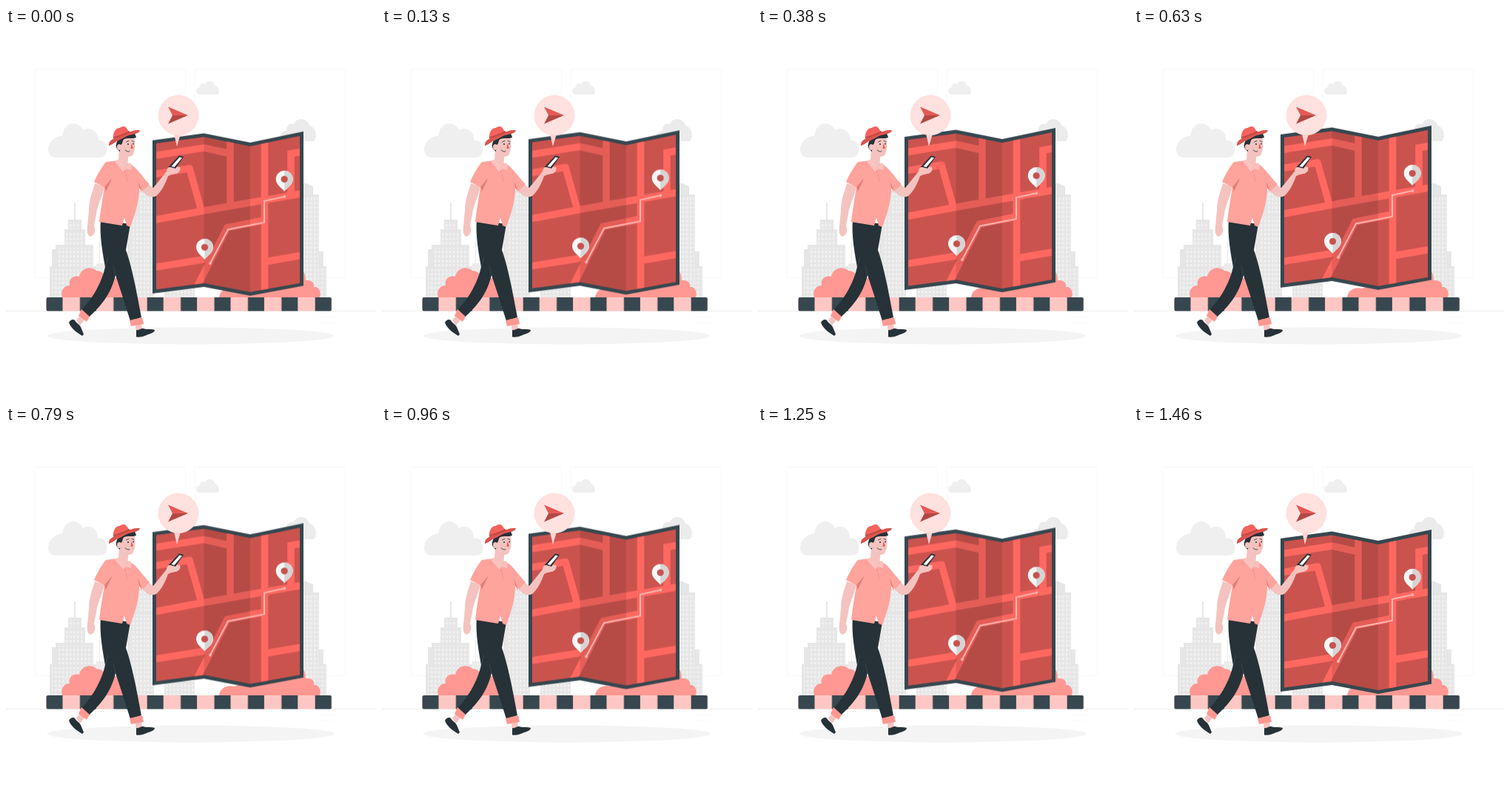
An HTML page that plays this animation: 500 px wide and 500 px high, repeating every 1500 ms.

```html
<!DOCTYPE html>
<html lang="en">
<head>
<meta charset="utf-8">
<title>Walking with a map</title>
<style>
html, body { margin: 0; width: 100%; height: 100%; overflow: hidden; background: #fff; }
svg { display: block; width: 100vw; height: 100vh; }
.map { animation: float 1.5s linear infinite; }
@keyframes float {
  0%, 97.4%, 100% { transform: translateY(0); }
  48.6% { transform: translateY(-9.4px); }
}
.skin { fill: #f4c3bf; }
.dark { fill: #263238; }
.slate { fill: #37474f; }
.shirt { fill: #ffa39d; }
.road { fill: none; stroke: #ff6861; stroke-width: 9.5; }
.line { fill: none; stroke: #263238; stroke-width: .8; stroke-linecap: round; }
</style>
</head>
<body>
<svg viewBox="0 0 500 500">
  <defs>
    <pattern id="windows" width="5" height="6" patternUnits="userSpaceOnUse">
      <rect x="1" y="1" width="2.6" height="3.6" fill="#f1f1f1"/>
    </pattern>
    <pattern id="kerb" x="76.5" width="45.4" height="20" patternUnits="userSpaceOnUse">
      <rect width="45.4" height="20" fill="#37474f"/>
      <rect width="23.4" height="20" fill="#ffc7c4"/>
    </pattern>
    <clipPath id="sheet">
      <path d="M203 156L267.500 147.500L330 160L397 146V345L330 357L267.500 345L203 353.500Z"/>
    </clipPath>
    <g id="pin">
      <path d="M0 16.500C-3 12 -11.500 8 -11.500 0A11.500 11.500 0 0 1 11.500 0C11.500 8 3 12 0 16.500Z" fill="#f7f7f7"/>
      <path d="M0 16.500C3 12 11.500 8 11.500 0A11.500 11.500 0 0 0 0 -11.500Z" fill="#d5d5d5"/>
      <circle r="4.600" fill="#c8524d"/>
    </g>
  </defs>

  <!-- backdrop -->
  <g fill="none" stroke="#f8f8f8">
    <path d="M39.500 55.500H242.500V337.500H39.500ZM255.500 55.500H458.500V337.500H255.500Z"/>
    <path d="M416 390.500H447M420 398.500H444" stroke="#fafafa"/>
  </g>
  <path d="M0 382.500H500" stroke="#ebebeb"/>
  <g fill="#ebebeb">
    <path d="M66 175C54 174 54 156 66 149C72 144 76 148 77 142C79 128 98 124 104 138C114 132 126 141 124 152C134 149 140 164 134 172Q131 175 126 175Z" fill="#efefef"/>
    <path d="M260 90C256 88 256 81 262 80C262 75 266 74 269 76C271 70 281 71 282 78C287 78 290 86 286 90Z" fill="#efefef"/>
    <path d="M373 153C368 149 371 139 379 139C378 131 385 128 389 130C393 120 407 121 410 132C418 133 422 146 416 153Z"/>
  </g>
  <g id="city">
    <path d="M59 364V322H62V299H67V293H79V272H84V259H92V237H94V259H102V272H107V293H118V322H126V364Z" fill="#e6e6e6"/>
    <path d="M122 364V318H126V290H127V318H134V364Z" fill="#ececec"/>
    <path d="M164 364V252H173V228H178V219H200V364Z" fill="#e6e6e6"/>
    <path d="M214 364V345H255V364ZM396 364V210H406L415 214V225H423V302H429V322H433V364Z" fill="#e6e6e6"/>
    <path d="M86 262H101V272H86ZM81 275H106V293H81ZM69 297H117V322H69ZM62 326H124V363H62ZM180 222H200V250H180ZM168 255H200V363H168ZM402 228H422V363H402ZM423 325H432V363H423ZM216 347H254V363H216Z" fill="url(#windows)"/>
  </g>
  <g fill="#ff9892">
    <path d="M76 364C73 354 79 348 86 348C84 338 92 334 99 336C101 324 115 321 122 328C130 328 134 334 134 338H160V364Z"/>
    <path d="M288 364C289 354 299 349 308 352L390 324C400 323 405 330 405 341C415 340 417 346 416 350C424 349 426 358 424 364Z"/>
  </g>
  <rect x="54" y="364" width="386.500" height="18.500" rx="3" fill="url(#kerb)"/>
  <ellipse cx="249.500" cy="416" rx="194" ry="11.500" fill="#f4f4f4"/>

  <g class="map">
    <path class="slate" d="M198 152L267.500 142.500L330 155L402 140V348.500L330 362L267.500 350L198 359Z"/>
    <g clip-path="url(#sheet)">
      <rect x="198" y="140" width="204" height="224" fill="#cb534e"/>
      <g class="road">
        <path d="M198 173L267.500 162L303 170"/>
        <path d="M303 145V243M349.500 145V364"/>
        <path d="M198 198L248 190L264 247" stroke-linejoin="round"/>
        <path d="M198 260L267.500 247L402 223.500"/>
        <path d="M198 324L273 312M350 316L402 307"/>
        <path d="M256 354L299 270L349 260"/>
        <path d="M402 167L385 170V228"/>
      </g>
      <path d="M267.500 140H330V364H267.500Z" fill="#000" opacity=".1"/>
    </g>
    <path d="M276 318L300 272.500L349 263V234L376.500 228" fill="none" stroke="#ffb5b0" stroke-width="2"/>
    <g fill="#ffb5b0"><circle cx="276" cy="318" r="1.900"/><circle cx="376.500" cy="228" r="1.900"/></g>
    <use href="#pin" x="268.500" y="296.500"/>
    <use href="#pin" x="376.200" y="204.500"/>
  </g>

  <!-- speech bubble -->
  <path d="M227 143H236L231 160Z" fill="#ffd3d0"/>
  <circle cx="233" cy="118" r="26.700" fill="#ffe1df" stroke="#ffd3d0" stroke-width=".8"/>
  <path d="M219 106.500L246 118H225Z" fill="#e35a54"/>
  <path d="M219 129.500L246 118H225Z" fill="#b34843"/>

  <!-- walker -->
  <g>
    <path class="skin" d="M95 395L101 388L107 393L100 402ZM174 398L183 398L184 409L176 409Z"/>
    <path class="dark" d="M85 398C87 394 91 393 93 395C95 399 99 400 101 404L105 414L103 416C97 412 88 407 85 398Z"/>
    <path class="dark" d="M176 408C180 409 182 406 185 406C190 408 196 406 201 408C201 412 194 413 190 415C186 417 181 418 176 417.500Z"/>
    <path class="dark" d="M128 259C126 280 131 306 134 323C129 346 114 370 101 382L112 391C126 377 141 363 148 334C154 352 162 376 168 396L183 391C178 364 171 325 162 300L168 265Z"/>
    <path d="M134 323L138 310M148 334L145 321" stroke="#455a64" stroke-width=".5"/>
    <path d="M102 380L113 390L109 397L98 389ZM167 395L184 391L186 400L169 403Z" fill="#ff9892"/>
    <path class="skin" d="M120 210L133 214C130 228 123 241 122 252L119 267C122 275 119 280 114 282C110 280 109 275 110 268L112 247C112 232 117 221 120 210Z"/>
    <path class="skin" d="M183 219L192 211L199 216L216 195C219 189 228 186 235 188C237 194 232 197 224 198L219 200C215 212 209 222 203 227C195 231 188 225 183 219Z"/>
    <path class="shirt" d="M135 181L151 179L168 184C178 189 185 203 194 211C191 215 187 218 183 221L180 216C180 236 174 252 168 269L163 267L160 256L157 267L126 262C128 245 131 228 133 215L119 208C123 199 129 188 135 181Z"/>
    <path d="M133 215L144 202L135 221ZM180 216L178 205L183 219Z" fill="#e77c76"/>
    <path d="M159 187L164 207M148 189L145 183" fill="none" stroke="#ee8c86" stroke-width=".7"/>
    <path class="skin" d="M153 164L165 169V176L164 189C158 187 154 184 152 179Z"/>
    <path d="M147 180L153 177C155 183 160 187 163 190L158 194ZM163 190L166 182L170 184L169 192Z" fill="#ffc2be"/>
    <path class="skin" d="M155 150L173 147C175 155 175 166 171 172C167 176 159 173 155 169Z"/>
    <path class="dark" d="M149 157C150 148 161 145 174 142L176 148C171 150 164 148 160 150C157 151 158 157 155 158L154 167C150 164 148 161 149 157Z"/>
    <ellipse class="skin" cx="153" cy="161" rx="3" ry="4"/>
    <path d="M169.500 156L172 162Q170.500 164 168.500 163Z" fill="#e85f59"/>
    <path class="line" d="M162.500 154L166 152.500M170 152.500L173 153.500M161 165Q164 168 167 167"/>
    <g class="dark"><circle cx="165" cy="157" r="1"/><circle cx="172" cy="156.500" r=".9"/></g>
    <path d="M145 150C144 143 147 135 154 135C157 132 162 132 164 137L169 143L150 153Z" fill="#f4625b"/>
    <path d="M139 159C138 153 144 150 149 148C158 145 172 136 181 138.500C180 143 170 144 161 146.500C152 149 147 157 139 159Z" fill="#d9544e"/>
    <path d="M145 148Q155 146 167 140" fill="none" stroke="#b74741" stroke-width="1.500"/>
    <path class="dark" d="M219.500 188L234 172.500L240 174L229 190Z"/>
    <path d="M223.500 187L234.500 174.500L238 175.500L227.500 188Z" fill="#fff"/>
    <path class="skin" d="M217 193Q218 188 222 188L229 190L235 188Q236 194 230 197Z"/>
  </g>
</svg>
</body>
</html>
```
